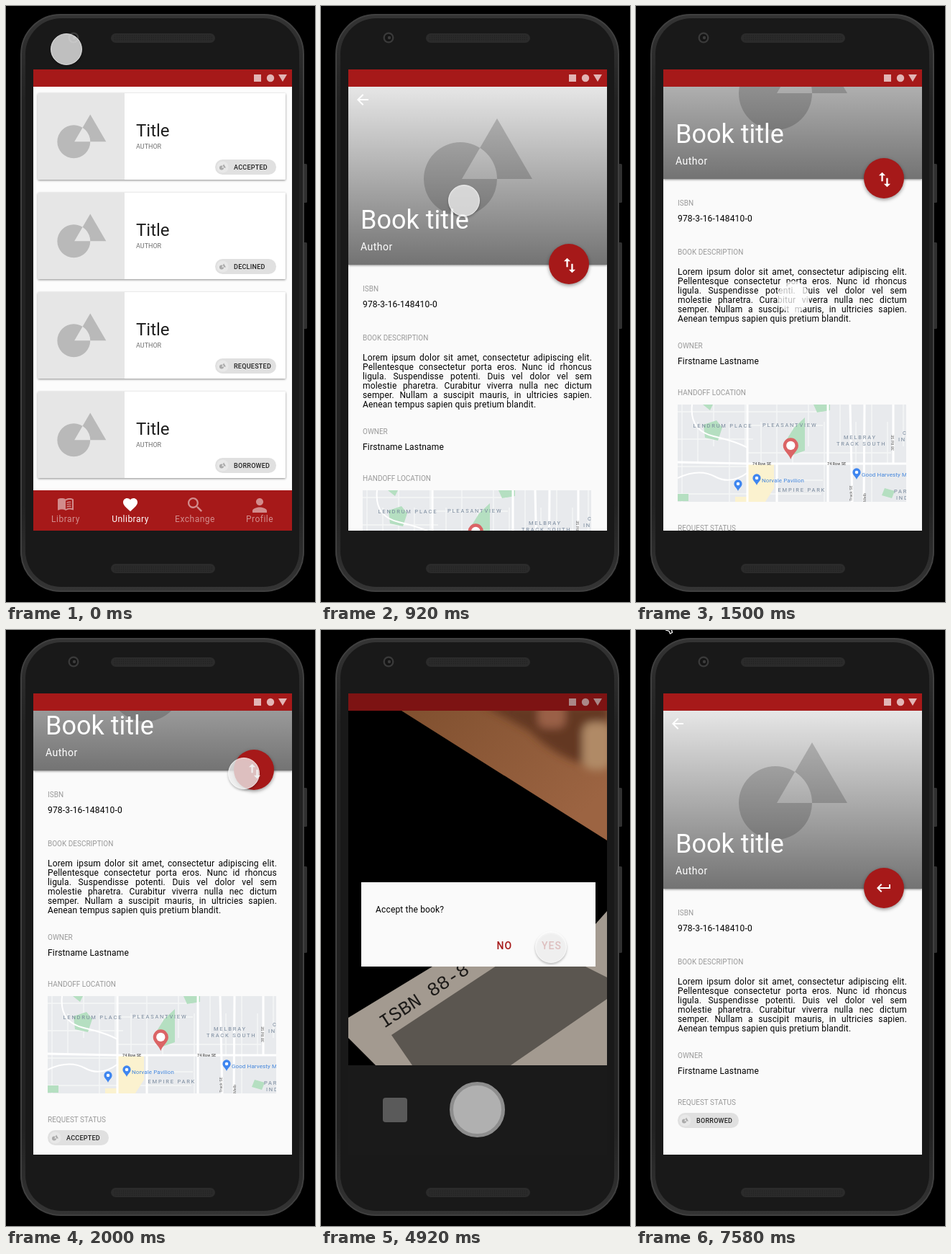
Animation, 430 px wide and 827 px high, one loop 7.66 s. Source, as an HTML page:

```html
<!DOCTYPE html>
<html lang="en">
<head>
<meta charset="utf-8">
<title>Book exchange prototype</title>
<style>
  html, body { margin: 0; width: 100%; height: 100%; overflow: hidden; background: #000; }
  svg { font-family: Roboto, sans-serif; }
  #stage { display: block; width: 430px; height: 827px; }
  .lift { filter: drop-shadow(0 1px 1.5px rgba(0,0,0,.45)); }
  .fab { filter: drop-shadow(0 2px 2.5px rgba(0,0,0,.4)); }
  .copy { font: 12px/13px Roboto, sans-serif; letter-spacing: .17px; color: #000; white-space: nowrap; }
  .copy div { text-align-last: justify; }
  .copy div:last-child { text-align-last: left; }
  .area { font-size: 7.5px; letter-spacing: 1.8px; fill: #75869a; }
</style>
</head>
<body>
<svg id="stage" viewBox="0 0 430 827"></svg>
<script>
const RED = '#a61919';
const FPS = 12, LOOP = 7660;

const ICONS = {
  book: 'M21 5c-1.11-.35-2.33-.5-3.5-.5-1.95 0-4.05.4-5.5 1.5-1.45-1.1-3.55-1.5-5.5-1.5S2.45 4.9 1 6v14.65c0 .25.25.5.5.5.1 0 .15-.05.25-.05C3.1 20.45 5.05 20 6.5 20c1.95 0 4.05.4 5.5 1.5 1.35-.85 3.8-1.5 5.5-1.5 1.65 0 3.35.3 4.75 1.05.5.2.75-.2.75-.45V6c-.6-.45-1.25-.75-2-1zm0 13.5c-1.1-.35-2.3-.5-3.5-.5-1.7 0-4.15.65-5.5 1.5V8c1.35-.85 3.8-1.5 5.5-1.5 1.2 0 2.4.15 3.5.5zM13.5 10q3-1.4 6-.8v1.4q-3-.6-6 .8zm0 2.9q3-1.4 6-.8v1.4q-3-.6-6 .8zm0 2.9q3-1.4 6-.8v1.4q-3-.6-6 .8z',
  heart: 'M12 21.35l-1.45-1.32C5.4 15.36 2 12.28 2 8.5 2 5.42 4.42 3 7.5 3c1.74 0 3.41.81 4.5 2.09C13.09 3.81 14.76 3 16.5 3 19.58 3 22 5.42 22 8.5c0 3.78-3.4 6.86-8.55 11.54z',
  search: 'M15.5 14h-.79l-.28-.27C15.41 12.59 16 11.11 16 9.5 16 5.91 13.09 3 9.5 3S3 5.91 3 9.5 5.91 16 9.5 16c1.61 0 3.09-.59 4.23-1.57l.27.28v.79l5 4.99L20.49 19zm-6 0C7.01 14 5 11.99 5 9.5S7.01 5 9.5 5 14 7.01 14 9.5 11.99 14 9.5 14z',
  person: 'M12 12c2.21 0 4-1.79 4-4s-1.79-4-4-4-4 1.79-4 4 1.79 4 4 4zm0 2c-2.67 0-8 1.34-8 4v2h16v-2c0-2.66-5.33-4-8-4z',
  back: 'M20 11H7.83l5.59-5.59L12 4l-8 8 8 8 1.41-1.41L7.83 13H20z',
  swap: 'M16 17.01V10h-2v7.01h-3L15 21l4-3.99zM9 3L5 6.99h3V14h2V6.99h3z',
  enter: 'M19 7v4H5.83l3.58-3.59L8 6l-6 6 6 6 1.41-1.41L5.83 13H21V7z'
};

const rect = (x, y, w, h, fill, more = '') =>
  `<rect x="${x}" y="${y}" width="${w}" height="${h}" fill="${fill}" ${more}/>`;
const circle = (x, y, r, fill, more = '') =>
  `<circle cx="${x}" cy="${y}" r="${r}" fill="${fill}" ${more}/>`;
const path = (d, fill, more = '') => `<path d="${d}" fill="${fill}" ${more}/>`;
const text = (x, y, s, size, fill, more = '') =>
  `<text x="${x}" y="${y}" font-size="${size}" fill="${fill}" ${more}>${s}</text>`;
const icon = (name, x, y, scale = 1, fill = '#fff') =>
  path(ICONS[name], fill, `transform="translate(${x} ${y}) scale(${scale})"`);
const label = (y, s) => text(58, y, s, 10, '#999');
const body = (x, y, s) => text(x, y, s, 12, '#000', 'letter-spacing=".17"');

// placeholder artwork: circle and triangle, overlap knocked out
const art = (x, y, scale, fill = '#b9b9b9') =>
  path('M-51 0a51 51 0 1 0 102 0a51 51 0 1 0-102 0zM2 0L51-84L100 0z', fill,
    `fill-rule="evenodd" transform="translate(${x} ${y}) scale(${scale})"`);

const chip = (x, y, s) =>
  rect(x, y, 85, 21, '#e0e0e0', 'rx="10.5"') + circle(x + 10.5, y + 10.5, 8, '#e8e8e8') +
  art(x + 9, y + 11.5, .06, '#aaa') +
  text(x + 26, y + 13.7, s, 9, '#222', 'font-weight="500" letter-spacing=".25"');

const statusBar = () => rect(38, 88, 360, 24, RED) +
  `<g fill="#fff" opacity=".68"><rect x="345" y="95" width="10" height="10"/>
   <circle cx="368" cy="100" r="5.2"/><path d="M379 95h12l-6 10z"/></g>`;

const card = (y, state) =>
  `<g class="lift">${rect(44.5, y, 344.5, 120, '#fff', 'rx="1"')}</g>` +
  rect(44.5, y, 120.5, 120, '#e6e6e6') + art(94.3, y + 67.3, .45) +
  text(181, y + 59.5, 'Title', 24, '#1f1f1f') +
  text(181, y + 77, 'AUTHOR', 9, '#707070') + chip(291, y + 92, state);

const navLabel = (x, s, on) =>
  text(x, 716, s, 12, '#fff', `text-anchor="middle" letter-spacing=".5" opacity="${on ? 1 : .5}"`);

const list = () => rect(38, 88, 360, 640, '#fcfcfc') +
  ['ACCEPTED', 'DECLINED', 'REQUESTED', 'BORROWED'].map((s, i) => card(121 + 138 * i, s)).join('') +
  rect(38, 672, 360, 56, RED) +
  `<g opacity=".5">${icon('book', 71, 678.5) + icon('search', 249.5, 678.5, 1.15) + icon('person', 338, 678, 1.25)}</g>` +
  icon('heart', 161, 680) +
  ['Library', 'Unlibrary', 'Exchange', 'Profile'].map((s, i) => navLabel(83 + 90 * i, s, i == 1)).join('') +
  statusBar();

const pin = (x, y, s, fill, hole) =>
  `<g transform="translate(${x} ${y}) scale(${s})">${path('M0 0C-2-7-10-11-10-18A10 10 0 0 1 10-18C10-11 2-7 0 0z', fill)}${circle(0, -18, hole, '#fff')}</g>`;

function map() {
  let lanes = '';
  for (let i = 0; i < 15; i++) lanes += `M${6 + i * 22} ${i % 2 * 24}v${i % 3 ? 58 : 135}`;
  for (let i = 0; i < 7; i++) lanes += `M${i % 2 * 97} ${10 + i * 19}h${i % 3 ? 105 : 200}`;
  const area = (x, y, s) => `<text class="area" x="${x}" y="${y}">${s}</text>`;
  const shop = (x, y, s) => text(x, y, s, 8, '#4285dc', 'letter-spacing=".1"');
  const side = (x, y, s) => text(0, 0, s, 5.5, '#666', `transform="translate(${x} ${y}) rotate(-90)"`);
  return `<svg x="58" y="672" width="318" height="135">` + rect(0, 0, 318, 135, '#e8eaed') +
    path(lanes, 'none', 'stroke="#f6f7f8" stroke-width="1.3"') +
    path('M36 28l18-6 8 10-6 18-18-4zM35 0h14l-4 8zM152 48l10-16 15-14v46l-17 6-10-8zM189 0h23v8l-18 3zM0 124h15v10H0zM288 116l14 4-4 10-14-4z', '#b5dfc1') +
    path('M97 82h37v34l-12 19H97zM80 128h16v7H80z', '#fbf2cf') +
    path('M0 80L97 82L318 82M97 0v135M138 82v53M209 0v135M240 0l3 135M260 0l-1 135M300 0v82', 'none', 'stroke="#fff" stroke-width="3"') +
    path('M0 102q30-14 52-2t46-6M20 0q-4 36 30 44T97 60', 'none', 'stroke="#fff" stroke-width="2"') +
    area(21.5, 32, 'LENDRUM PLACE') + area(118, 31, 'PLEASANTVIEW') +
    area(231, 48, 'MELBRAY') + area(221, 57, 'TRACK SOUTH') +
    area(139.5, 120.5, 'EMPIRE PARK') + area(313, 42, 'C') + area(307, 51, 'IN') +
    area(301, 123, 'PAR') + area(304, 132, 'IND') +
    text(104, 84, '74 Row SE', 5.5, '#555', 'font-weight="500"') +
    text(208, 84, '74 Row SE', 5.5, '#555', 'font-weight="500"') +
    side(301, 64, '38 Rd SE') + side(243, 138, 'n Track SE') + side(262, 135, 'Melb') +
    pin(110, 112, .56, '#3f86f0', 4) + pin(84, 120, .56, '#3f86f0', 4) + pin(249, 104, .56, '#3f86f0', 4) +
    shop(117, 107.5, 'Norvale Pavilion') + shop(256, 99.5, 'Good Harvesty Ma') +
    pin(157.3, 76, 1.06, '#db6465', 5.8) + `</svg>`;
}

const COPY = [
  'Lorem ipsum dolor sit amet, consectetur adipiscing elit.',
  'Pellentesque consectetur porta eros. Nunc id rhoncus',
  'ligula. Suspendisse potenti. Duis vel dolor vel sem',
  'molestie pharetra. Curabitur viverra nulla nec dictum',
  'semper. Nullam a suscipit mauris, in ultricies sapien.',
  'Aenean tempus sapien quis pretium blandit.'
];

const hero = () =>
  `<g class="lift">${rect(38, 112, 360, 247, '#e6e6e6')}</g>` + art(194, 240, 1, '#bdbdbd') +
  rect(38, 112, 360, 247, 'url(#shade)') + icon('back', 46, 118) +
  text(55, 309, 'Book title', 36, '#fff') +
  text(55, 339, 'Author', 14, '#fff', 'letter-spacing=".5"');

const detail = (id, glyph, rest) => rect(38, 88, 360, 640, '#fafafa') +
  `<g id="${id}">` + hero() +
  `<g class="fab">${circle(345, 358, 28, RED)}</g>` + glyph +
  label(395.5, 'ISBN') + body(58, 418, '978-3-16-148410-0') +
  label(463.5, 'BOOK DESCRIPTION') +
  `<foreignObject x="58" y="481.5" width="319" height="80"><div class="copy">${COPY.map(s => `<div>${s}</div>`).join('')}</div></foreignObject>` +
  label(593.5, 'OWNER') + body(58, 616, 'Firstname Lastname') + rest + `</g>` + statusBar();

const camera = () => rect(38, 88, 360, 640, '#000') +
  path('M112 112H398V292z', 'url(#wood)') +
  `<g filter="url(#soft)">${path('M225 104H400V190Q340 190 290 140z', '#633720') +
    rect(302, 100, 38, 36, '#9a6047', 'rx="10"') + rect(364, 128, 40, 66, '#b08a66', 'rx="14"')}</g>` +
  path('M38 538L155 467L382 408L398 390V604H76L38 566z', '#a39a90') +
  path('M98 562L244 466H366L398 482V512L264 604H127z', '#5b5650') +
  text(0, 0, 'ISBN 88-8', 26.5, '#1c1a18', 'font-family="Liberation Mono, monospace" transform="translate(88 553) rotate(-33)"') +
  rect(38, 604, 360, 124, '#1a1a1a') + rect(86, 649, 34, 34, '#5a5a5a', 'rx="4"') +
  circle(217.5, 665.5, 36, '#b0b0b0', 'stroke="#8d8d8d" stroke-width="5"') +
  statusBar() + rect(38, 88, 360, 24, '#000', 'opacity=".25"') +
  rect(56, 350, 326, 117, '#fafafa') + body(76, 392, 'Accept the book?') +
  ['NO', 'YES'].map((s, i) => text(244.5 + 62.5 * i, 443, s, 14, RED, 'font-weight="500" letter-spacing="1"')).join('');

const speaker = y => rect(146, y, 145, 13, '#2b2b2b', 'rx="6.5"') + rect(149, y + 2, 139, 9, 'url(#mesh)', 'rx="4.5"');

const phone = () =>
  rect(413, 219, 6, 54, '#303030', 'rx="1.5"') + rect(413, 328, 6, 120, '#303030', 'rx="1.5"') +
  rect(21, 12, 393, 800, 'url(#rim)', 'rx="55" stroke="#404040" stroke-width="2"') +
  rect(27, 17, 381, 789, '#191919', 'rx="50"') +
  circle(94, 44, 7.5, '#3a3a3a') + circle(94, 44, 5.2, '#151515') + circle(95, 44, 2.2, '#3c3c3c') +
  speaker(38) + speaker(774);

const stage = document.getElementById('stage');
stage.innerHTML = `<defs>
  <clipPath id="screen">${rect(38, 88, 360, 640, '#fff')}</clipPath>
  <linearGradient id="shade" x2="0" y2="1"><stop stop-opacity="0"/><stop offset="1" stop-opacity=".5"/></linearGradient>
  <linearGradient id="wood" x2="1" y2=".6"><stop stop-color="#80502f"/><stop offset="1" stop-color="#9c6442"/></linearGradient>
  <linearGradient id="rim" x2="0" y2="1"><stop stop-color="#343434"/><stop offset=".15" stop-color="#222"/><stop offset=".85" stop-color="#222"/><stop offset="1" stop-color="#343434"/></linearGradient>
  <pattern id="mesh" width="3" height="3" patternUnits="userSpaceOnUse">${circle(1.5, 1.5, .9, '#222')}</pattern>
  <filter id="soft"><feGaussianBlur stdDeviation="6"/></filter></defs>` +
  phone() + `<g clip-path="url(#screen)">
  <g id="list">${list()}</g>
  <g id="accepted">${detail('scroller', icon('swap', 332.2, 346.2, 1.15),
    label(658.5, 'HANDOFF LOCATION') + map() + label(846.5, 'REQUEST STATUS') + chip(58, 858, 'ACCEPTED'))}</g>
  <g id="camera">${camera()}</g>
  <g id="borrowed">${detail('still', icon('enter', 333, 346),
    label(658.5, 'REQUEST STATUS') + chip(58, 670, 'BORROWED'))}</g></g>
  <g id="touch">${circle(0, 0, 21.5, '#fff', 'fill-opacity=".73" stroke="#fff" stroke-opacity=".75"')}</g>
  ${path('M41 0l5 1.5 1.5 3.5 3-1.5L49.5 0', '#000', 'id="pointer" stroke="#fff" stroke-width="1.3"')}`;

// keyframes: [frame, value, ...]
const TOUCH = [[0, 84, 60], [3, 199, 144], [10, 199, 144], [13, 199, 522], [16, 199, 448], [20, 239, 360],
  [24, 331, 199], [52, 331, 199], [53, 294, 456], [59, 320, 440], [62, 320, 440], [69, 250, 558],
  [70, 250, 558], [71, 248, 560], [84, 248, 560], [86, 103, 20], [87, 103, -60]];
const SCROLL = [[13, 0], [16, 74], [20, 164]];

function along(keys, f) {
  const i = keys.findIndex(k => k[0] >= f);
  if (i < 0) return keys[keys.length - 1].slice(1);
  if (!i) return keys[0].slice(1);
  const a = keys[i - 1], b = keys[i], p = (f - a[0]) / (b[0] - a[0]);
  return a.slice(1).map((v, j) => v + (b[j + 1] - v) * p);
}

const $ = id => document.getElementById(id);
const show = (id, on) => $(id).style.display = on ? '' : 'none';
const move = (id, x, y) => $(id).setAttribute('transform', `translate(${Math.round(x)} ${Math.round(y)})`);

function draw(f) {
  const p = Math.min(1, Math.max(0, (f - 4.655) / 3.6));
  show('list', f < 9);
  show('accepted', f > 4 && f < 53);
  show('camera', f > 52 && f < 61);
  show('borrowed', f > 60);
  show('pointer', f > 90);
  move('accepted', 360 * (1 - p * p * (3 - 2 * p)), 0);
  move('scroller', 0, -along(SCROLL, f)[0]);
  move('touch', ...along(TOUCH, f));
  const pressed = f > 12 && f < 20;
  $('touch').style.filter = pressed ? 'none' : 'drop-shadow(0 2px 1.5px rgba(0,0,0,.3))';
}

const start = performance.now();
function tick() {
  const t = (performance.now() - start) % LOOP;
  draw(Math.floor((t + 3.4) * FPS / 1000));
  requestAnimationFrame(tick);
}
tick();
</script>
</body>
</html>
```
